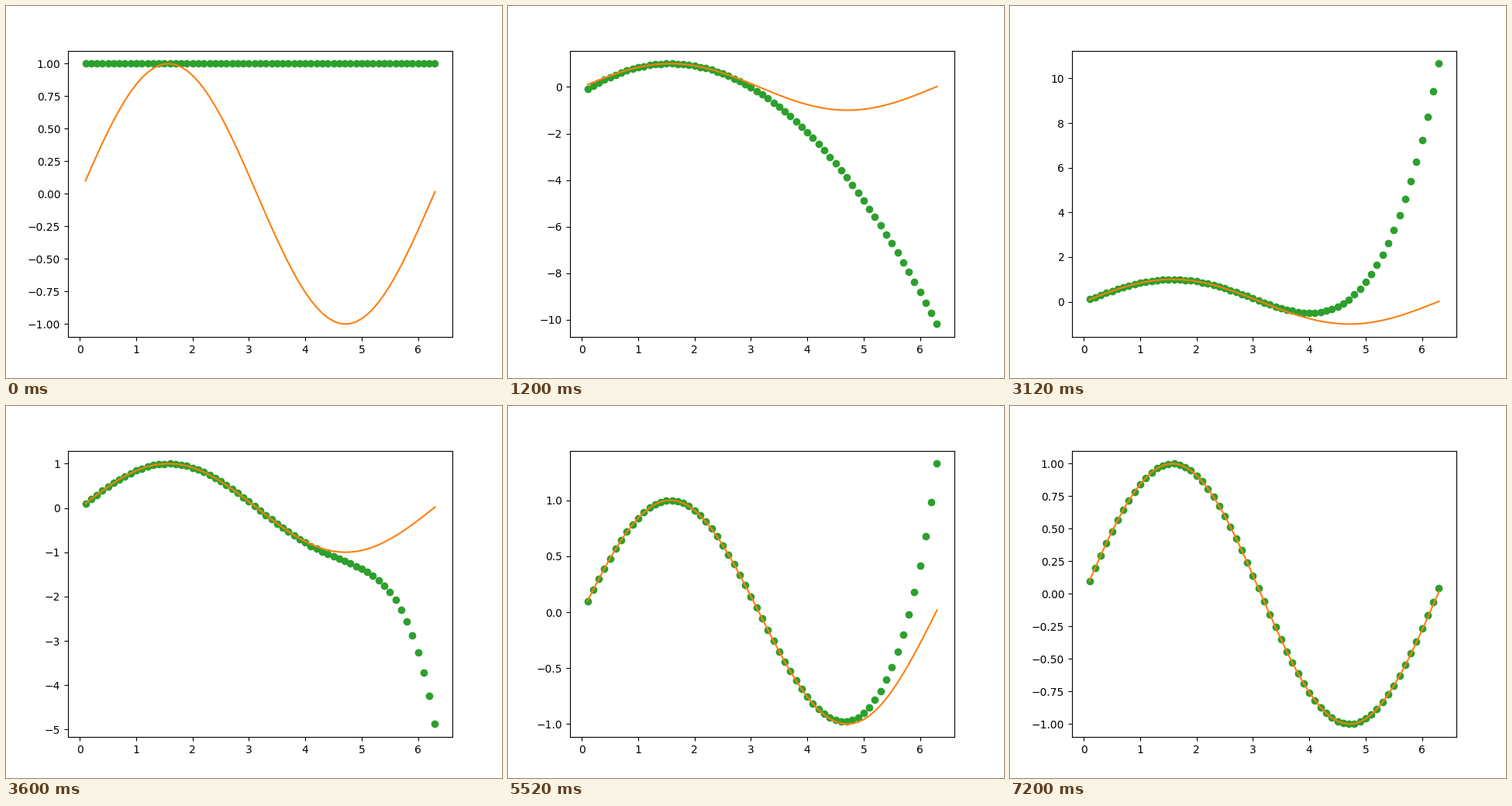
These frames come from a looping animation (640 by 480 pixels, 8 s). A matplotlib script:

```python
import math

import matplotlib.pyplot as plt
import numpy as np
from matplotlib.animation import FuncAnimation

STEP_MS = 400
FRAMES = 20
FRAMES_PER_TERM = 3

x = np.arange(0.1, 6.35, 0.1)


def taylor_sin(x, order):
    """Taylor polynomial of sin around pi/2, up to degree 2 * order."""
    u = x - math.pi / 2
    return sum((-1) ** n * u ** (2 * n) / math.factorial(2 * n)
               for n in range(order + 1))


fig, ax = plt.subplots(figsize=(6.4, 4.8), dpi=100)
dots, = ax.plot(x, taylor_sin(x, 0), "o", color="C2")
ax.plot(x, np.sin(x), color="C1")


def update(frame):
    dots.set_ydata(taylor_sin(x, frame // FRAMES_PER_TERM))
    ax.relim()
    ax.autoscale_view()
    return dots,


anim = FuncAnimation(fig, update, frames=FRAMES, interval=STEP_MS,
                     repeat=True, repeat_delay=0, blit=False)

plt.show()
```
